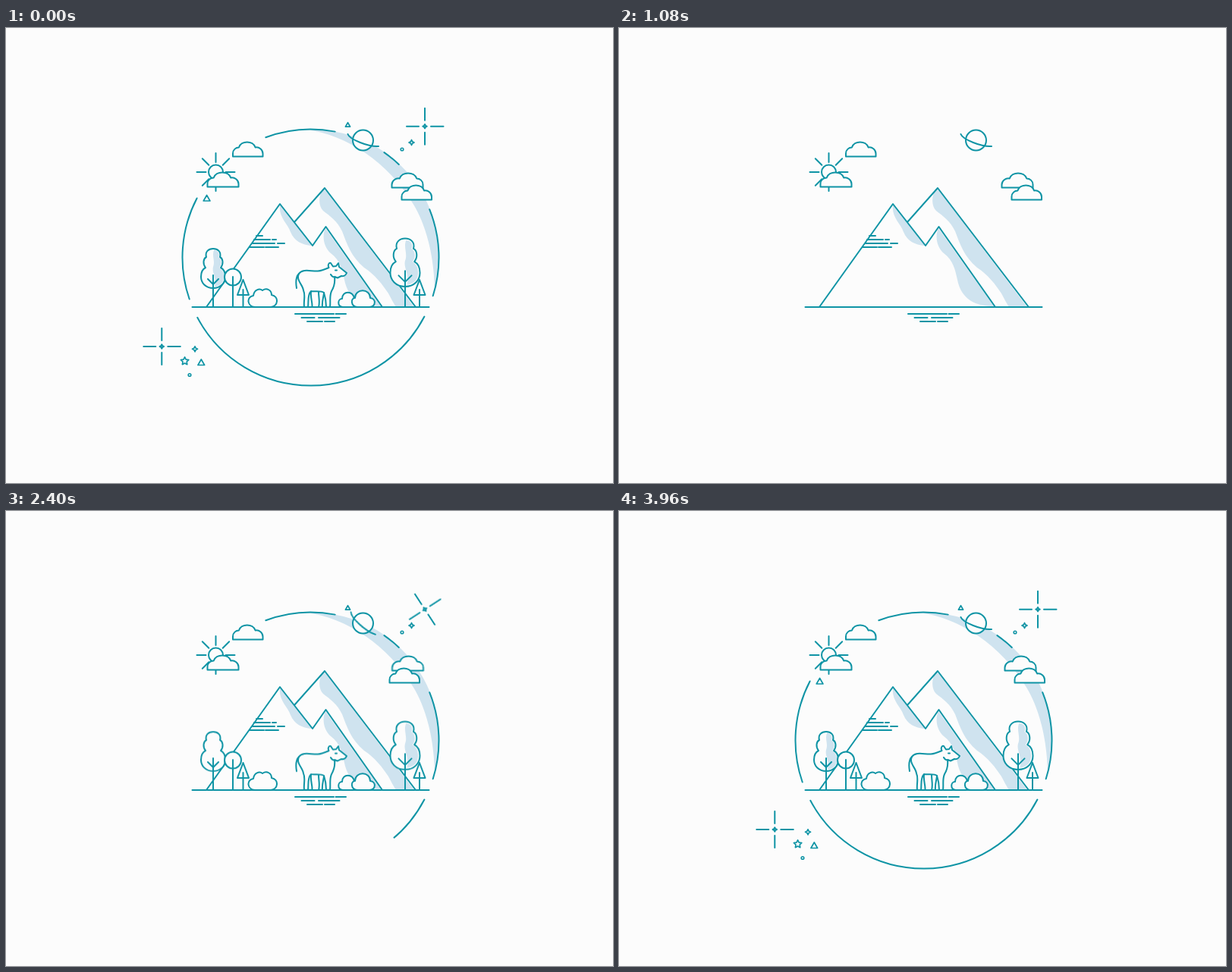
Animation of 800 by 600 pixels, one loop 7040 ms. Source, as an HTML page:

```html
<!DOCTYPE html>
<html lang="en">
<head>
<meta charset="utf-8">
<title>Mountain scene</title>
<style>
html, body { margin: 0; width: 100%; height: 100%; overflow: hidden; background: #fcfcfc; }
svg { display: block; width: 100vw; height: 100vh; }
.line { fill: none; stroke: #0f94a5; stroke-width: 2; stroke-linecap: round; stroke-linejoin: round; }
.solid { fill: #fcfcfc; }
.shade { fill: #cfe3ef; stroke: none; }
</style>
</head>
<body>
<svg id="stage" viewBox="0 0 800 600"></svg>
<script>
const LOOP = 7040, STEP = 40, RESET = 160;
const EASE = 'cubic-bezier(.33,0,.4,1)';
const stage = document.getElementById('stage');
const clips = [];

function add(parent, tag, attrs = {}) {
  const el = document.createElementNS('http://www.w3.org/2000/svg', tag);
  for (const key in attrs) el.setAttribute(key, attrs[key]);
  return parent.appendChild(el);
}
const group = (parent = stage, cls = 'line') => add(parent, 'g', { class: cls });
const path = (parent, d, cls = 'line') => add(parent, 'path', { d, class: cls });
const circle = (parent, cx, cy, r, cls = 'line') => add(parent, 'circle', { cx, cy, r, class: cls });

// Finished picture until RESET, then the given steps, then hold.
function play(el, steps, easing = EASE) {
  const first = steps[0][1], last = steps[steps.length - 1][1];
  const at = (ms, props, ease = 'linear') => ({ ...props, offset: ms / LOOP, easing: ease });
  const clip = el.animate([
    at(0, last), at(RESET, last), at(RESET, first),
    ...steps.map(([ms, props]) => at(ms, props, easing)),
    at(LOOP, last)
  ], { duration: LOOP, iterations: Infinity });
  clip.pause();
  clips.push(clip);
  return el;
}
const turn = (el, x, y, steps, easing) => {
  el.style.transformOrigin = `${x}px ${y}px`;
  return play(el, steps.map(([ms, transform]) => [ms, { transform }]), easing);
};
const fade = (el, from, to) => play(el, [[from, { opacity: 0 }], [to, { opacity: 1 }]], 'linear');
function draw(el, from = RESET, to = 1040) {
  el.setAttribute('pathLength', 1);
  el.style.strokeDasharray = '1 2';
  return play(el, [[from, { strokeDashoffset: 1 }], [to, { strokeDashoffset: 0 }]]);
}
const slide = (el, steps) => turn(el, 0, 0, steps.map(([ms, x]) => [ms, `translate(${x}px,0px)`]));
const pop = (el, x, y, from) => turn(el, x, y, [[from, 'scale(0)'], [from + 120, 'scale(1)']]);

// Great circle: arcs revealed clockwise by one sweeping mask
const CX = 401.5, CY = 302.5, R = 169;
const onCircle = deg => {
  const a = deg * Math.PI / 180;
  return `${(CX + R * Math.cos(a)).toFixed(2)} ${(CY + R * Math.sin(a)).toFixed(2)}`;
};
fade(path(stage, 'M395 134A167.5 167.5 0 0 1 565 345C564 290 549 250 534 228C505 180 450 140 395 134Z', 'shade'), 1880, 2360);
const mask = add(stage, 'mask', { id: 'sweep', maskUnits: 'userSpaceOnUse', x: 0, y: 0, width: 800, height: 600 });
const sweep = add(mask, 'circle', {
  cx: CX, cy: CY, r: R, fill: 'none', stroke: '#fff', 'stroke-width': 8,
  transform: `rotate(-111 ${CX} ${CY})`
});
draw(sweep, 2000, 3080);
const ring = group();
ring.setAttribute('mask', 'url(#sweep)');
for (const [a, b] of [[-110.5, -79], [-55, -46.5], [-22, 17.5], [27.5, 152], [161, 207.5]])
  path(ring, `M${onCircle(a)}A${R} ${R} 0 0 1 ${onCircle(b)}`);

// Mountains
function mountain(outline, fill, shades) {
  path(stage, fill, 'solid');
  for (const d of shades) fade(path(stage, d, 'shade'), RESET, 960);
  draw(path(stage, outline));
}
mountain('M540 368L420 211L380 256', 'M540 368L420 211L380 256L404 368Z', [
  'M418 212C411 222 412 235 418 241C427 248 437 255 443 268C449 284 455 302 472 316C486 325 496 338 504 350Q509 360 514 368H538L422 215Z'
]);
mountain('M264 368L361 232L404 287L421.5 262L496 368', 'M264 368L361 232L404 287L421.5 262L496 368Z', [
  'M361 233C359 250 371 257 375 269C380 281 390 286 403 287Z',
  'M421 264C416 275 419 289 428 297C441 307 443 319 446 332C450 352 463 367 494 367Z'
]);
for (const [y, ...runs] of [[274, 330, 338], [279, 327, 348, 351, 356], [284, 325, 354, 358, 367], [289, 321, 340, 342, 359]])
  for (let i = 0; i < runs.length; i += 2) draw(path(stage, `M${runs[i]} ${y}H${runs[i + 1]}`));

// Sun, planet and clouds
for (let i = 0; i < 8; i++) {
  const c = Math.cos(i * Math.PI / 4), s = Math.sin(i * Math.PI / 4);
  draw(path(stage, `M${276.5 + 13 * c} ${190 + 13 * s}L${276.5 + 25 * c} ${190 + 25 * s}`));
}
draw(circle(stage, 276.5, 190, 9.5, 'line solid'));

draw(circle(stage, 470.5, 148, 13.5, 'line solid'));
const orbit = draw(path(stage, 'M491 156C478 157 453 147 450.5 140'));
turn(orbit, 470.5, 148, [[2200, 'rotate(0deg)'], [2420, 'rotate(21deg)'], [2960, 'rotate(0deg)']]);

function cloud(x, y, w, flip, steps) {
  const holder = group();
  const k = w / 40, left = flip ? x + w : x, sx = flip ? -k : k;
  const pt = (u, v) => `${left + u * sx} ${y + v} `;
  draw(path(holder, `M${pt(40, -4)}L${pt(40, 0)}L${pt(0, 0)}L${pt(0, -4)}` +
    `C${pt(0, -9)}${pt(4, -12)}${pt(8, -12)}C${pt(11, -21.5)}${pt(27, -21.5)}${pt(30, -12)}` +
    `C${pt(35, -13)}${pt(40, -9)}${pt(40, -4)}`, 'line solid'));
  slide(holder, steps);
}
cloud(299, 169.5, 39.5, false, [[2960, 0], [3440, 2], [3960, 0]]);
cloud(265.5, 209.5, 41, false, [[2720, 0], [3240, -8.3], [3960, 0]]);
cloud(508.5, 210.5, 41, true, [[2120, -4], [2400, 0.5], [3360, 0]]);
cloud(521.5, 226.5, 39.5, false, [[2120, -4], [2400, -16], [3280, 0]]);

// Trees
function grow(el, x, skew) {
  return turn(el, x, 368, [[1640, `skewX(${skew}deg) scaleY(0)`], [2440, 'skewX(0deg) scaleY(1)']]);
}
function bigTree(x, base, k, skew, shadeFrom) {
  const tree = group();
  const pt = (u, v) => `${x + u * k} ${base + v * k} `;
  const curve = (...p) => 'C' + p.map(([u, v]) => pt(u, v)).join('');
  path(tree, 'M' + pt(0, 0) +
    curve([-10, 0], [-16, -7], [-16, -15]) + curve([-16, -21], [-14, -25], [-10, -27]) +
    curve([-14, -32], [-13, -39], [-9, -41]) + curve([-11, -48], [-6, -52], [0, -52]) +
    curve([6, -52], [11, -48], [9, -41]) + curve([13, -39], [14, -32], [10, -27]) +
    curve([14, -25], [16, -21], [16, -15]) + curve([16, -7], [10, 0], [0, 0]), 'line solid');
  fade(path(tree, 'M' + pt(1, -50) +
    curve([-2, -42], [3, -36], [0, -28]) + curve([-2, -20], [5, -14], [2, -2]) +
    curve([10, -3], [14, -8], [14, -15]) + curve([14, -21], [12, -24], [8, -27]) +
    curve([12, -32], [11, -38], [7, -41]) + curve([9, -46], [6, -50], [1, -50]), 'shade'), shadeFrom, shadeFrom + 200);
  path(tree, `M${x} 368V${base - 17 * k}M${pt(-7, -12)}L${pt(0, -5)}L${pt(7, -12)}`);
  grow(tree, x, skew);
}
function pine(x, skew) {
  const tree = group();
  path(tree, `M${x} 332L${x - 7.5} 352H${x + 7.5}Z`, 'line solid');
  path(tree, `M${x} 368V345`);
  grow(tree, x, skew);
}
bigTree(273, 343, 1, -20, 2480);
const roundTree = group();
circle(roundTree, 299, 328.5, 11, 'line solid');
path(roundTree, 'M299 368V328');
grow(roundTree, 299, -20);
pine(312.5, -20);
bigTree(526, 341, 1.22, 16, 2160);
pine(545, 16);

// Cow
const cow = group();
path(cow, 'M386 324C391 317 402 321 411 320.5C417 320 421 318 425.5 316C423.5 312 426 309 428 310L431 314.5L435 314L438 310L439 315L449 323Q447 328 442 327L437 329.5L433 328C434 336 432 342 429 347C426 354 428 360 427 368H422C422 360 421 355 419 349C416 346 405 348 402 347C397 352 399 360 398 368H393C392 360 395 352 392 346C391 338 382 333 386 324Z', 'line solid');
path(cow, 'M386 324C381 329 382 337 383 343M402 348C401 356 404 361 403.5 368H399M412 348C412 356 414 361 412 368H417C416 360 419 354 419 349M428 325Q430 329 434 328.5M434 319.5H436');
turn(cow, 415, 368, [[1640, 'scaleY(0)'], [2440, 'scaleY(1)']]);

// Bushes
function bush(x, ...shapes) {
  const el = group();
  for (const d of shapes) path(el, d, 'line solid');
  turn(el, x, 368, [[1040, 'scale(0)'], [1940, 'scale(1)']]);
}
bush(338.5, 'M328 368C317 367 317 354 326 353C327 345 334 343 338 346C344 342 350 346 350 352C360 354 359 367 349 368Z');
bush(462,
  'M444 368C436 367 437 357 443 357C443 346 458 346 459 357C464 359 464 367 457 368Z',
  'M463 368C454 367 454 356 460 356C460 343 480 343 480 356C488 357 488 367 479 368Z');

// Ground and water
const ground = group();
path(ground, 'M245.5 368H557.5');
path(ground, 'M381 377H432M434.5 377H448M389.5 382H406.5M412 382H439.5M397 387H417M420 387H433');
turn(ground, 400, 368, [[RESET, 'scaleY(0)'], [1040, 'scaleY(1)']]);

// Small sky shapes
function polygon(x, y, radii, count, from) {
  const pts = Array.from({ length: count }, (_, i) => {
    const a = i * 2 * Math.PI / count - Math.PI / 2, r = radii[i % radii.length];
    return `${(x + r * Math.cos(a)).toFixed(2)} ${(y + r * Math.sin(a)).toFixed(2)}`;
  });
  const el = path(stage, `M${pts.join('L')}Z`);
  el.style.strokeWidth = 1.7;
  pop(el, x, y, from);
}
function dot(x, y, from) {
  const el = circle(stage, x, y, 1.8);
  el.style.strokeWidth = 1.6;
  pop(el, x, y, from);
}
function sparkle(x, y, from, end) {
  const el = group();
  path(el, `M${x - 24} ${y}h16M${x + 8} ${y}h16.5M${x} ${y - 24}v16M${x} ${y + 8}v16`);
  path(el, `M${x} ${y - 2.7}l.9 1.8 1.8.9-1.8.9-.9 1.8-.9-1.8-1.8-.9 1.8-.9Z`);
  turn(el, x, y, [
    [from, 'rotate(-90deg) scale(0)'], [from + 160, 'rotate(-33deg) scale(1)'],
    [from + 960, 'rotate(-1.5deg) scale(1)'], [end, 'rotate(0deg) scale(1)']
  ], 'ease-out');
}
sparkle(552, 129.7, 2240, 3640);
polygon(450.5, 128.3, [3.6], 3, 2160);
polygon(534.5, 151, [3.5, 1.6], 8, 2240);
dot(522, 160, 2240);

sparkle(205.3, 420, 2480, 3960);
polygon(249, 423.3, [3.5, 1.6], 8, 2520);
polygon(235.6, 439.3, [5.4, 2.7], 10, 2560);
polygon(257.3, 442, [5], 3, 2560);
dot(242, 457.5, 2600);
polygon(264.6, 225.5, [5], 3, 2760);

const start = performance.now();
function tick() {
  const now = Math.max(0, performance.now() - start) % LOOP;
  const t = Math.floor(now / STEP) * STEP;
  for (const clip of clips) clip.currentTime = t;
  requestAnimationFrame(tick);
}
tick();
</script>
</body>
</html>
```
